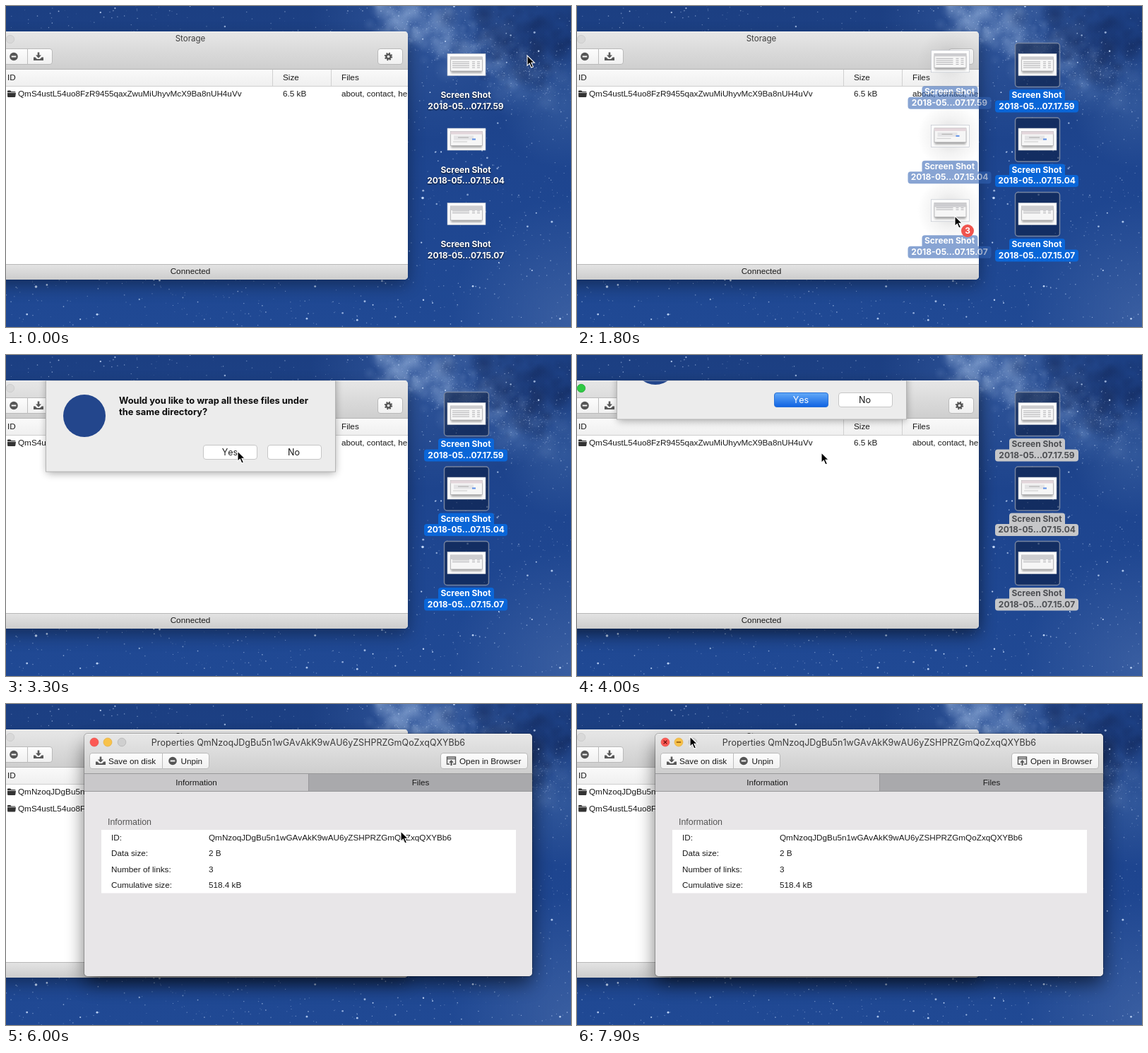
Write an HTML page with a canvas that moves like this. It is 800 px wide and 454 px high and loops after 8000 ms.

```html
<!DOCTYPE html>
<html lang="en">
<head>
<meta charset="utf-8">
<title>Storage</title>
<style>
  html, body { margin: 0; width: 100%; height: 100%; overflow: hidden; background: #1f4690; }
  canvas, svg { position: absolute; left: 0; top: 0; width: 800px; height: 454px; display: block; }
  text { font: 11.72px "Liberation Sans", Arial, sans-serif; font-kerning: none; fill: #1a1a1a; white-space: pre; }
  .mid { text-anchor: middle; }
  .ui { font-family: Inter, Roboto, sans-serif; font-size: 12.6px; }
  .title { font-family: Inter, Roboto, sans-serif; font-size: 12.5px; fill: #3c3c3c; text-anchor: middle; }
  .small { font-size: 11.5px; }
  .ask { font: 700 12.88px Inter, Roboto, sans-serif; fill: #0c0c0c; }
  .section { font-size: 12.4px; fill: #555; }
  .name { font: 650 12px Inter, Roboto, sans-serif; fill: #fff; text-anchor: middle; }
  .free .name { text-shadow: 0 1px 2px rgba(0,0,0,.8); }
  .plate, .frame { visibility: hidden; }
  .picked .plate, .picked .frame { visibility: visible; }
  .plate { fill: #0a66d8; }
  .frame { fill: rgba(8,22,54,.5); stroke: #75839f; stroke-width: 1.5; }
  .dim .plate { fill: #c6c7c9; }
  .dim .name { fill: #4c4e52; }
  #ghosts .plate { fill: #3364b4; }
</style>
</head>
<body>
<canvas id="sky" width="800" height="454"></canvas>
<svg id="stage" viewBox="0 0 800 454" xmlns="http://www.w3.org/2000/svg"></svg>
<script>
const LOOP = 8000, STEP = 100;
const WRAP_ID = "QmNzoqJDgBu5n1wGAvAkK9wAU6yZSHPRZGmQoZxqQXYBb6";
const SITE_ID = "QmS4ustL54uo8FzR9455qaxZwuMiUhyvMcX9Ba8nUH4uVv";

// ---- sky ----
function paintSky() {
  const c = document.getElementById("sky").getContext("2d");
  let seed = 41;
  const rnd = () => (seed = (seed * 16807) % 2147483647) / 2147483647;
  const spread = () => rnd() + rnd() + rnd() - 1.5;
  const puff = (x, y, r, rgb, a) => {
    const g = c.createRadialGradient(x, y, 0, x, y, r);
    g.addColorStop(0, `rgba(${rgb},${a})`);
    g.addColorStop(1, `rgba(${rgb},0)`);
    c.fillStyle = g;
    c.fillRect(x - r, y - r, 2 * r, 2 * r);
  };
  const star = (x, y, r, a) => {
    c.fillStyle = `rgba(205,225,255,${a})`;
    c.beginPath();
    c.arc(x, y, r, 0, 7);
    c.fill();
  };
  const base = c.createLinearGradient(0, 0, 0, 454);
  base.addColorStop(0, "#1c3f82");
  base.addColorStop(.5, "#1e458f");
  base.addColorStop(1, "#204994");
  c.fillStyle = base;
  c.fillRect(0, 0, 800, 454);
  puff(600, 20, 170, "80,120,190", .4);
  puff(800, 440, 170, "95,125,180", .4);
  puff(790, 140, 90, "85,125,185", .35);
  puff(715, 112, 45, "100,140,200", .3);
  // the cloud band: light wisps, with dark dust to its right
  for (let i = 0; i < 330; i++) {
    const along = rnd();
    puff(530 + along * 250 + spread() * 35, along * 115 + spread() * 42,
      4 + rnd() * 15, "165,192,230", (.04 + .2 * rnd()) * (1.15 - along));
  }
  for (let i = 0; i < 110; i++)
    puff(735 + spread() * 85, 42 + spread() * 60, 5 + rnd() * 17, "18,38,86", .08 + .2 * rnd());
  for (let i = 0; i < 700; i++) {
    const along = rnd();
    star(540 + along * 250 + spread() * 50, along * 120 + spread() * 50, .35 + rnd() * .4, .1 + rnd() * .4);
  }
  for (let i = 0; i < 1900; i++) {
    const big = rnd() > .93;
    star(rnd() * 800, rnd() * 454, big ? .8 + rnd() * .7 : .4 + rnd() * .5, big ? .55 + rnd() * .4 : .12 + rnd() * .5);
  }
  star(590, 271.5, 1.8, .95);
  star(42.5, 397, 1.8, .95);
}

// ---- markup helpers ----
const txt = (x, y, s, cls = "") => `<text x="${x}" y="${y + 4.2}" class="${cls}">${s}</text>`;
const box = (x, y, w, h, fill, more = "") =>
  `<rect x="${x}" y="${y}" width="${w}" height="${h}" fill="${fill}" ${more}/>`;
const dot = (x, y, r, fill, more = "") => `<circle cx="${x}" cy="${y}" r="${r}" fill="${fill}" ${more}/>`;
const line = (d, color, w = 1) => `<path d="${d}" fill="none" stroke="${color}" stroke-width="${w}"/>`;
const group = (id, inner, more = "") => `<g id="${id}" ${more}>${inner}</g>`;
const button = (x, y, w, h, fill = "url(#btn)", edge = "#b9b9b9") =>
  box(x + .5, y + .5, w - 1, h - 1, fill, `rx="3.5" stroke="${edge}"`);
const grad = (id, a, b) => `<linearGradient id="${id}" x1="0" y1="0" x2="0" y2="1">
  <stop stop-color="${a}"/><stop offset="1" stop-color="${b}"/></linearGradient>`;
const blur = (id, n) => `<filter id="${id}" x="-30%" y="-60%" width="160%" height="220%">
  <feGaussianBlur stdDeviation="${n}"/></filter>`;

const minus = (x, y) => dot(x, y, 5.8, "#555") + box(x - 3.3, y - 1, 6.6, 2, "#f5f5f5");
const tray = (x, y) => `<path transform="translate(${x} ${y})" fill="#585858"
  d="M-1.3-6H1.3V-2H4L0 2.2L-4-2H-1.3ZM-7 1H-4.5L-2 3.5H2L4.5 1H7V5.5H-7Z"/>`;
const gear = (x, y) => dot(x, y, 3.1, "none", 'stroke="#555" stroke-width="2.5"') +
  dot(x, y, 4.7, "none", 'stroke="#555" stroke-width="2" stroke-dasharray="1.9 1.79"');
const folder = y => `<path transform="translate(2 ${y - 5})" fill="#333"
  d="M0 1.5Q0 .5 1 .5H4.2L5.5 2H10.5Q11.5 2 11.5 3H0ZM0 3.7H12L11.3 9Q11.2 10 10.2 10H1.2Q.2 10 .1 9Z"/>`;
const browser = (x, y) => `<g transform="translate(${x} ${y})">
  <path d="M-2.5 4.5H-6V-5.5H6V4.5H2.5" fill="none" stroke="#555" stroke-width="1.4"/>
  <path d="M-6-3H6" stroke="#555" stroke-width="1.4"/>
  <path d="M0-1.5L3.5 2.2H1.1V6.5H-1.1V2.2H-3.5Z" fill="#555"/></g>`;
const row = (y, id, isDir) => (isDir ? folder(y) : "") + txt(isDir ? 17 : 5, y, id);

// ---- desktop items ----
const NAMES = ["2018-05...07.17.59", "2018-05...07.15.04", "2018-05...07.15.07"];
const itemY = i => 83 + 105.5 * i;

function thumb(y, kind) {
  let s = box(625, y - 15.5, 54, 31, "#fdfdfd", 'stroke="#b9bec8" stroke-width=".6"') +
    box(630, y - 8, 44, 20, "#555", 'opacity=".5" filter="url(#b2)"') +
    box(629.5, y - 11, 45, 20, "#f6f6f6", 'stroke="#a5a5a8" stroke-width=".7"') +
    box(629.5, y - 11, 45, kind === 2 ? 6 : 4, kind === 1 ? "#e3d6db" : "#cdcdd0");
  if (kind === 1) {
    s += box(634, y - 5, 28, 6, "#e4e4e6") + box(640, y - 3, 15, 1, "#aaa") +
      box(660, y - 1, 5, 2, "#5d8fe8") + box(633, y + 3, 20, 1, "#ccc");
  } else {
    for (let k = 0; k < (kind ? 2 : 4); k++)
      s += line(`M632 ${y - 4 + k * 2.7}h24m4 0h4m3 0h4`, "#a9a9ac", .9);
  }
  return s;
}
function labels(i) {
  const y = itemY(i);
  return `<path class="plate" d="M616 ${y + 35}H687Q691 ${y + 35} 691 ${y + 39}V${y + 50.5}H706Q710 ${y + 50.5} 710 ${y + 54.5}
      V${y + 63.5}Q710 ${y + 67.5} 706 ${y + 67.5}H596Q592 ${y + 67.5} 592 ${y + 63.5}V${y + 54.5}Q592 ${y + 50.5} 596 ${y + 50.5}H612V${y + 39}Q612 ${y + 35} 616 ${y + 35}Z"/>` +
    txt(651, y + 43, "Screen Shot", "name") + txt(651, y + 58.5, NAMES[i], "name");
}
const item = i => group("item" + i,
  `<rect class="frame" x="620.5" y="${itemY(i) - 30.5}" width="63" height="62" rx="4"/>` +
  thumb(itemY(i), i) + labels(i));
const ghost = i => dot(651.5, itemY(i), 46, "url(#halo)") + thumb(itemY(i), i) +
  `<g class="picked" opacity=".58">${labels(i)}</g>`;

// ---- windows ----
function storage() {
  return box(-40, 48, 608, 346, "#000", 'id="shade" filter="url(#b12)"') +
    `<g clip-path="url(#mainClip)">` +
    box(-20, 36, 589, 351, "#fff") + box(-20, 36, 589, 54, "url(#bar)") +
    line("M0 36.5H569", "#f4f4f4") + line("M0 89.5H569", "#b4b4b4") +
    dot(6, 47, 5.7, "#d9d9d9", 'id="zoom" stroke="#cacaca" stroke-width=".8"') +
    txt(261, 46, "Storage", "title small") +
    button(-10, 60, 76, 23) + line("M30.5 60V83", "#bdbdbd") + minus(11, 71.5) + tray(46, 71.5) +
    button(526, 60, 36, 23) + gear(541.5, 71.5) +
    box(-20, 90, 589, 23, "url(#head)") + line("M0 113.5H569", "#cfcfcf") +
    line("M377.5 90V113M460.5 90V113", "#d0d0d0") +
    txt(2, 101, "ID") + txt(392, 101, "Size") + txt(475, 101, "Files") +
    group("rowsOne", row(124, SITE_ID, true)) +
    group("rowsFour", row(124, SITE_ID, true) + row(147.5, "QmW6sKM4MWF87") +
      row(171, "QmXPnjALr1eJdMsj") + row(194.5, "QmfLrHLr7PdCt7dp")) +
    group("rowsTwo", row(124, WRAP_ID, true) + row(147.5, SITE_ID, true)) +
    group("cells", txt(392, 124, "6.5 kB") + txt(475, 124, "about, contact, help")) +
    box(-20, 365, 589, 22, "url(#foot)") + line("M0 365.5H569", "#b8b8b8") +
    txt(261, 375, "Connected", "mid") + `</g>`;
}
function sheet() {
  const inner = box(58, 20, 408, 147, "#000", 'opacity=".36" filter="url(#b6)"') +
    box(56.5, -20, 410, 185, "#ececec", 'stroke="#b5b5b5"') +
    dot(111, 86, 30, "#23468c") +
    txt(160, 64.5, "Would you like to wrap all these files under", "ask") +
    txt(160, 81, "the same directory?", "ask") +
    button(279, 127, 77, 21, "#fff", "#c6c6c6") +
    group("yesOn", button(279, 127, 77, 21, "url(#blue)", "#2a72d8")) +
    button(370, 127, 77, 21, "#fff", "#c6c6c6") +
    `<text id="yes" x="317" y="141.7" class="ui mid">Yes</text>` + txt(407.5, 137.5, "No", "ui mid");
  return `<g id="sheetWrap" clip-path="url(#sheetClip)">${group("sheet", inner)}</g>`;
}
function properties() {
  const facts = [["ID:", WRAP_ID], ["Data size:", "2 B"], ["Number of links:", "3"], ["Cumulative size:", "518.4 kB"]];
  let bars = "";
  for (let k = 0; k < 12; k++)
    bars += `<rect class="bar" x="425.6" y="203.7" width="5" height="11.5" rx="1.6" transform="rotate(${k * 30} 428.1 225.5)"/>`;
  const info = box(111, 65, 634, 320, "#e8e6e8") + box(111, 42, 634, 56, "url(#bar)") +
    button(118, 69, 170, 23) + line("M221.5 69V92", "#bdbdbd") +
    tray(134, 80.5) + txt(145, 80.5, "Save on disk") + minus(236, 80.5) + txt(247.5, 80.5, "Unpin") +
    button(615, 69, 124, 23) + browser(630.5, 80.5) + txt(642, 80.5, "Open in Browser") +
    box(111, 98, 317, 26, "#c9c8ca") + box(428, 98, 317, 26, "#a9a9ac") +
    line("M111 98.5H745M111 123.5H745M428.5 98V124", "#98989a") +
    txt(269.5, 111, "Information", "mid") + txt(587, 111, "Files", "mid") +
    txt(144, 167, "Information", "section") + box(135, 178, 587, 89.5, "#fff") +
    facts.map(([k, v], i) => txt(149, 188.5 + i * 22.4, k) + txt(287, 188.5 + i * 22.4, v)).join("");
  return group("props",
    box(113, 58, 630, 336, "#000", 'opacity=".62" filter="url(#b14)"') +
    `<g clip-path="url(#propClip)">` + box(111, 42, 634, 343, "#fff") +
    group("loading", box(111, 42, 634, 23, "url(#bar)") + line("M111 65.5H745", "#b4b4b4") + bars) +
    group("info", info) + line("M111 42.5H745", "#f3f3f3") +
    dot(125, 54, 6, "#fc5a55", 'stroke="#e2463f" stroke-width=".6"') +
    dot(144, 54, 6, "#f8c24a", 'stroke="#dfa636" stroke-width=".6"') +
    dot(164, 54, 5.8, "#cfcfcf", 'stroke="#b5b5b5" stroke-width=".8"') +
    group("glyphs", line("M122.6 51.6L127.4 56.4M127.4 51.6L122.6 56.4", "#6b0f0c", 1.3) +
      line("M140.8 54H147.2", "#8a5208", 1.4)) +
    txt(428, 54.5, "Properties " + WRAP_ID, "title") + `</g>` +
    box(110.5, 41.5, 635, 344, "none", 'rx="5" stroke="#000" stroke-opacity=".22"'));
}

const defs = `<defs>
  ${grad("bar", "#e7e7e7", "#cecece")}${grad("head", "#fafafa", "#efefef")}${grad("foot", "#e4e4e4", "#cdcdcd")}
  ${grad("btn", "#fdfdfd", "#f0f0f0")}${grad("blue", "#64aaf8", "#0f62e2")}
  <radialGradient id="halo"><stop stop-color="#666" stop-opacity=".28"/><stop offset=".55" stop-color="#999" stop-opacity=".12"/>
    <stop offset="1" stop-color="#999" stop-opacity="0"/></radialGradient>
  ${blur("b2", 1.5)}${blur("b6", 6)}${blur("b12", 12)}${blur("b14", 14)}
  <clipPath id="mainClip"><rect x="-20" y="36" width="589" height="351" rx="5"/></clipPath>
  <clipPath id="propClip"><rect x="111" y="42" width="634" height="343" rx="5"/></clipPath>
  <clipPath id="sheetClip"><rect x="0" y="36.5" width="569" height="350"/></clipPath>
</defs>`;

const order = [0, 1, 2];
document.getElementById("stage").innerHTML = defs + group("desk", order.map(item).join("")) +
  storage() + sheet() + group("ghosts", order.map(ghost).join("")) + properties() +
  group("badge", dot(18, 21, 9, "#f0544e") + txt(18, 21, "3", "name")) +
  group("cursor", `<path d="M0 0V14.3L3.3 11.2L5.8 17L8.4 15.9L5.9 10.3H10.4Z" fill="#000" stroke="#fff" stroke-width="1.1"/>`);
paintSky();

// ---- motion ----
const POINTER = [[0, 738, 70], [200, 738, 70], [800, 632, 318], [1000, 658, 301], [1100, 658, 301],
  [1800, 535, 297], [2000, 535, 297], [2300, 508, 291], [2500, 505, 286], [3300, 328, 136],
  [3800, 330, 136], [4000, 346, 138], [4300, 400, 150], [5000, 559, 180], [6000, 559, 180],
  [6600, 559, 142], [7200, 559, 142], [7900, 160, 46]];
const SHEET = [[2000, 20], [2200, 96], [2300, 141], [2400, 159], [2500, 165],
  [3800, 165], [3900, 137], [4000, 91], [4100, 42], [4200, 10]];
const PICK = [400, 600, 800];
const DRAG = [1100, 2000], FOCUS = 3500, OPEN = 4400, LOADED = 5700;

function at(table, t) {
  const i = table.findIndex(k => k[0] > t);
  if (i === 0) return table[0].slice(1);
  if (i < 0) return table[table.length - 1].slice(1);
  const a = table[i - 1], b = table[i], p = (t - a[0]) / (b[0] - a[0]);
  const e = p * p * (3 - 2 * p);
  return a.slice(1).map((v, k) => v + (b[k + 1] - v) * e);
}
const el = id => document.getElementById(id);
const show = (id, on) => { el(id).style.display = on ? "" : "none"; };
const move = (id, x, y) => el(id).setAttribute("transform", `translate(${x.toFixed(1)} ${y.toFixed(1)})`);
const bars = [...document.querySelectorAll(".bar")];

function draw(t) {
  const [x, y] = at(POINTER, t);
  const focused = t >= FOCUS, opened = t >= OPEN, loaded = t >= LOADED;
  const active = focused && !opened, dragging = t >= DRAG[0] && t < DRAG[1];

  order.forEach(i => el("item" + i).setAttribute("class", t >= PICK[i] ? "picked" : "free"));
  el("desk").setAttribute("class", focused ? "dim" : "");

  el("shade").setAttribute("opacity", active ? .6 : .4);
  el("zoom").setAttribute("fill", active ? "#2fc944" : "#d9d9d9");
  el("zoom").setAttribute("stroke", active ? "#23ab36" : "#cacaca");
  show("rowsOne", !opened);
  show("rowsFour", opened && !loaded);
  show("rowsTwo", loaded);
  show("cells", !opened);

  const [bottom] = at(SHEET, t);
  show("sheetWrap", bottom > 36);
  move("sheet", 0, bottom - 165);
  show("yesOn", focused);
  el("yes").style.fill = focused ? "#fff" : "#222";

  show("ghosts", dragging);
  show("badge", dragging);
  move("ghosts", x - 658.5, y - 301.7);
  move("badge", x, y);

  show("props", opened);
  show("loading", !loaded);
  show("info", loaded);
  show("glyphs", x < 178 && y < 64);
  const lead = Math.floor((t - 4600) / STEP) + 24;
  bars.forEach((b, k) => {
    const age = (lead - k + 24) % 12;
    const v = Math.round(Math.max(0, age - 2) * 19);
    b.setAttribute("fill", `rgb(${v},${v},${v})`);
  });
  move("cursor", x, y);
}

const start = performance.now();
function tick(now) {
  const t = Math.max(0, now - start) % LOOP;
  draw(Math.floor(t / STEP) * STEP);
  requestAnimationFrame(tick);
}
draw(0);
requestAnimationFrame(tick);
</script>
</body>
</html>
```
